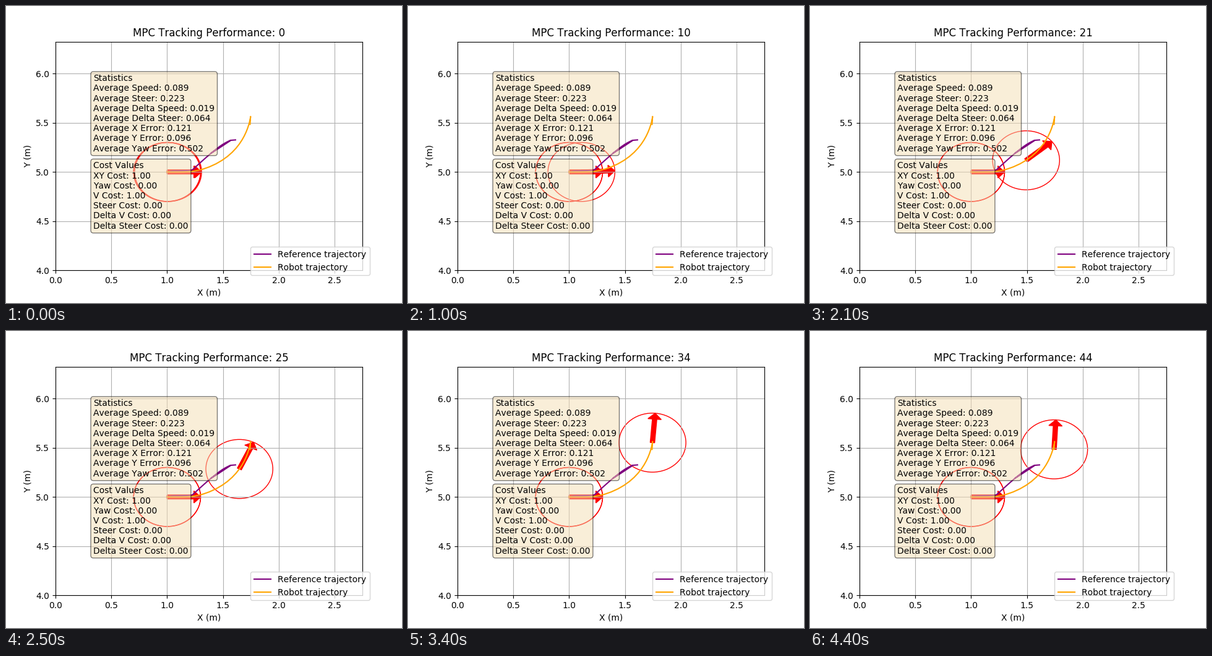
Recreate the animation shown at these times as a matplotlib script. Size 640 px wide and 480 px high, loop 4500 ms.

```python
import numpy as np
import matplotlib.pyplot as plt
from matplotlib.animation import FuncAnimation
from matplotlib.patches import Circle, Polygon

FRAMES = 45
INTERVAL = 100
RADIUS = 0.3

STATS = """Statistics
Average Speed: 0.089
Average Steer: 0.223
Average Delta Speed: 0.019
Average Delta Steer: 0.064
Average X Error: 0.121
Average Y Error: 0.096
Average Yaw Error: 0.502"""

COSTS = """Cost Values
XY Cost: 1.00
Yaw Cost: 0.00
V Cost: 1.00
Steer Cost: 0.00
Delta V Cost: 0.00
Delta Steer Cost: 0.00"""

plt.rcParams["text.kerning_factor"] = 6  # unkerned text


def speed(t):
    """Crawl, accelerate, brake, then roll slowly backwards."""
    return np.interp(t, [0, 11, 17, 19.5, 28, 36, 44],
                     [.009, .0115, .041, .069, .040, .001, -.021])


def heading(t):
    """Direction of travel, which trails the yaw in the turn."""
    return 1.55 * np.exp(-np.exp((20.4 - t) / 5.5))


def yaw_at(t):
    return 1.52 / (1 + np.exp((21.6 - t) / 3.2))


def drive():
    """Integrate the motion; one pose (x, y, yaw) per step."""
    t = np.arange(FRAMES)
    v, h = speed(t - 0.5), heading(t - 0.5)
    return np.column_stack([1 + np.cumsum(v * np.cos(h)),
                            5 + np.cumsum(v * np.sin(h)),
                            yaw_at(t)])


def reference():
    """Flat start, a bending climb, then a jump back and a straight rerun."""
    u = np.linspace(0, 1, 15)
    climb = np.column_stack([1.22 + 0.35 * u, 5.015 + 0.36 * u - 0.053 * u ** 4])
    return np.vstack([(1, 5), (1.05, 5.01), climb, climb[7], climb[-1], (1.613, 5.326)])


def arrow_points(x, y, yaw, length=RADIUS, width=0.2):
    shape = np.array([(0, .1), (0, -.1), (.8, -.1), (.8, -.3),
                      (1, 0), (.8, .3), (.8, .1)]) * (length, width)
    c, s = np.cos(yaw), np.sin(yaw)
    return shape @ np.array([(c, s), (-s, c)]) + (x, y)


def add_robot(x, y, yaw):
    ring = ax.add_patch(Circle((x, y), RADIUS, fill=False, color="r"))
    arrow = ax.add_patch(Polygon(arrow_points(x, y, yaw), color="r"))
    return ring, arrow


def add_note(y, text):
    ax.text(0.1234, y, text, transform=ax.transAxes, va="top", fontsize=10,
            bbox=dict(boxstyle="round", facecolor="wheat", alpha=0.5))


fig, ax = plt.subplots(figsize=(6.4, 4.8), dpi=100)
ax.set_xlim(0, 2.75)
ax.set_ylim(4, 6.325)
ax.set_xlabel("X (m)")
ax.set_ylabel("Y (m)")
ax.grid(True)
title = ax.set_title("")

# The start pose is drawn twice, which gives it a heavier outline.
poses = drive()
for _ in range(2):
    add_robot(1, 5, 0)
ring, arrow = add_robot(*poses[0])

path = np.vstack([(1, 5), poses[:, :2]])
ax.plot(*reference().T, color="purple", label="Reference trajectory")
ax.plot(*path.T, color="orange", label="Robot trajectory")
add_note(0.8577, STATS)
add_note(0.4754, COSTS)
ax.legend(loc=(0.635, -0.0215))


def update(step):
    x, y, yaw = poses[step]
    ring.center = x, y
    arrow.set_xy(arrow_points(x, y, yaw))
    title.set_text(f"MPC Tracking Performance: {step}")
    return ring, arrow, title


anim = FuncAnimation(fig, update, frames=FRAMES, interval=INTERVAL,
                     repeat=True, repeat_delay=0, blit=False)
plt.show()
```
